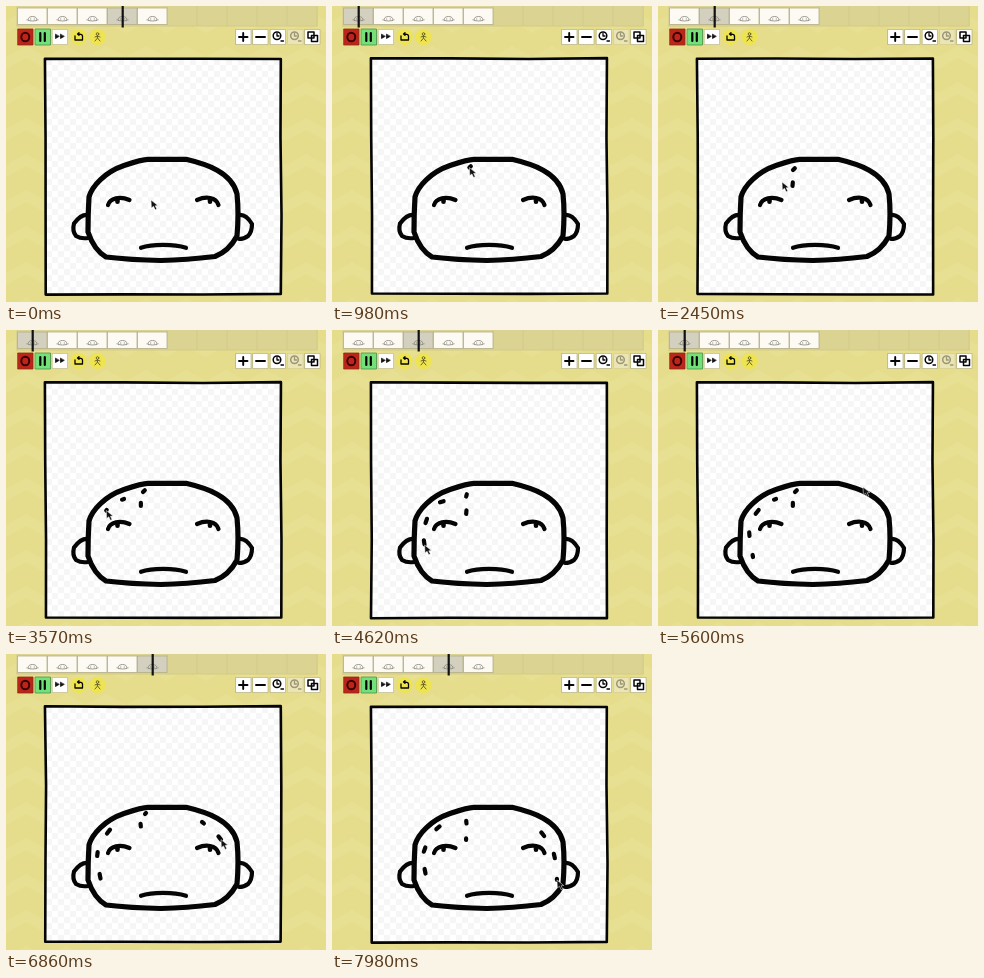
An HTML page for the animation above (8 s loop, 320 px wide and 296 px high).

```html
<!DOCTYPE html>
<html lang="en">
<head>
<meta charset="utf-8">
<title>Doodle recording</title>
<style>
html, body { margin: 0; width: 100%; height: 100%; overflow: hidden; background: #e5dd8c; }
svg { display: block; width: 100vw; height: 100vh; }
.ink { fill: none; stroke: #050505; stroke-linecap: round; stroke-linejoin: round; }
</style>
</head>
<body>
<svg viewBox="0 0 320 296" preserveAspectRatio="none">
  <defs>
    <pattern id="zigzag" width="40" height="36" patternUnits="userSpaceOnUse">
      <path d="M-2 16 20 4 42 16V28L20 16-2 28Z" fill="#e9e299"/>
    </pattern>
    <pattern id="check" x="40" y="53" width="12" height="12" patternUnits="userSpaceOnUse">
      <path d="M0 0h6v6h-6zM6 6h6v6h-6z" fill="#f6f6f6"/>
    </pattern>
  </defs>

  <rect width="320" height="296" fill="#e5dd8c"/>
  <rect width="320" height="296" fill="url(#zigzag)" opacity=".5"/>

  <rect x="10" width="302" height="20" fill="#dbd391"/>
  <path id="slots" fill="none" stroke="#d3ca88"/>
  <g id="cells"></g>
  <rect id="head" y="0" width="2.2" height="21.5" fill="#111"/>

  <g class="ink" stroke-width="1.9">
    <rect x="12" y="23" width="15" height="16" fill="#bd251b" stroke="#8b2b18" stroke-width=".8"/>
    <ellipse cx="19.3" cy="31" rx="4" ry="4.3" stroke="#300"/>
    <rect x="29.5" y="23" width="15" height="16" fill="#74e07a" stroke="#48904a" stroke-width=".8"/>
    <path d="M34.3 27v8M38.8 27v8" stroke-width="2.2"/>
    <rect x="46.5" y="23.5" width="15" height="15" fill="#fff" stroke="#b9b28a" stroke-width=".6"/>
    <path d="M49.5 28.5v4l3.5-2zM54.5 28.5v4l3.5-2z" fill="#111" stroke-width=".7"/>
    <g fill="#eee452" stroke="none">
      <circle cx="72.7" cy="31" r="8"/>
      <circle cx="91.5" cy="31" r="8"/>
    </g>
    <path d="M69 30v4h7.500v-4q0-2-5-2l1.500-1.300m-1.500 1.300 1.500 1.300" stroke-width="1.3"/>
    <g stroke="#6b6424" stroke-width="1">
      <path d="M91.500 29.500v2.500l-2.500 3M91.500 32l2.500 3M89 31l2.500-1 2.500 1"/>
      <circle cx="91.500" cy="28" r="1.300"/>
    </g>

    <g fill="#fff" stroke="#aaa47e" stroke-width=".6">
      <rect x="230" y="23.500" width="15" height="15"/>
      <rect x="247" y="23.500" width="15" height="15"/>
      <rect x="264.500" y="23.500" width="15" height="15"/>
      <rect x="282" y="23.500" width="15" height="15" fill="#ebe5b5" stroke="#d2c98d"/>
      <rect x="299" y="23.500" width="15" height="15"/>
    </g>
    <path d="M233 31h8.500M237.200 27v8M250 31h9"/>
    <g id="clock">
      <circle cx="271" cy="29.800" r="3.800" stroke-width="1.500"/>
      <path d="M271 27.500v2.500h2M275 35h2.500" stroke-width="1.300"/>
    </g>
    <use href="#clock" x="17.500" opacity=".35"/>
    <path d="M302 26h6v6h-6zM305.500 29.500h6v6h-6z" stroke-width="1.500"/>
  </g>

  <rect x="40" y="53" width="235" height="235" fill="#fff"/>
  <rect x="40" y="53" width="235" height="235" fill="url(#check)"/>
  <path id="border" class="ink" stroke-width="2.6"/>

  <g class="ink" stroke-width="5.200">
    <path d="M83 191C86 180 99 166 118 159.500Q136 153.300 142 153.300H180C200 158 226 166 231 188Q233 207 231 230Q223 245 209 250.500Q180 254 155 254.500Q125 254 100 251Q88 244 82 226Q82 207 83 191Z"/>
    <g stroke-width="4.200">
      <path d="M82 209Q75 208 68 217.500Q66 225 70 230Q75 233 82 232"/>
      <path d="M233 209Q240 208 246 218Q246 226 242 230Q238 233 233 233"/>
      <path d="M102 199C104 192 114 190 123.500 194M191 194C200 190 210 191 212.500 199"/>
      <path d="M111.500 194v1.800M204 194v1.800" stroke-width="4.600"/>
      <path d="M135 241.800C146 238 168 238 180 241.800"/>
    </g>
  </g>

  <path id="drops" class="ink" stroke-width="4.200"/>
  <path id="cursor" d="M0 0 .4 8 2.500 6.300 4.200 9.800 5.800 9 4.200 5.800 6.800 5.500Z" fill="#111" stroke="#fff" stroke-width=".5"/>
</svg>

<script>
const LOOP = 8000, STEP = 70, CELLS = 5, CELL_MS = 400 / 3, PHASE = 3.25;
const $ = id => document.getElementById(id);

// A drop starts at a cell count, lasts some cells and runs evenly through its key points.
const drops = [
  { start: 9, len: 10, keys: [[140, 159], [134, 165], [135, 174], [134, 186]] },
  { start: 25, len: 16, keys: [[118, 169], [106, 173], [96, 186], [91, 200], [92, 212], [95, 227]] },
  { start: 49, len: 15, keys: [[196, 168], [209, 178], [220, 192], [224, 209], [225, 227]] }
];
const rests = [[0, 145, 194], [2450, 124, 176], [5600, 205, 157]];

const clamp = (v, a, b) => Math.min(b, Math.max(a, v));
const mix = (a, b, k) => a + (b - a) * k;
const mixPoint = (p, q, k) => [mix(p[0], q[0], k), mix(p[1], q[1], k)];
const timeOf = count => (count - PHASE) * CELL_MS;

function along({ len, keys }, i) {
  const last = keys.length - 1;
  const u = clamp(i / (len - 1), 0, 1) * last;
  const k = Math.min(Math.floor(u), last - 1);
  return mixPoint(keys[k], keys[k + 1], u - k);
}

// Cursor stops: resting places and the two ends of every drop.
const stops = rests.concat(...drops.map(d => [
  [timeOf(d.start), ...along(d, 0)],
  [timeOf(d.start + d.len), ...along(d, d.len)]
])).sort((a, b) => a[0] - b[0]);

function cursorAt(t, count) {
  const drop = drops.find(d => count >= d.start && count < d.start + d.len);
  if (drop) return along(drop, count - drop.start - .3);
  const j = stops.findIndex(s => s[0] > t);
  const a = stops[j - 1], b = stops[j];
  const k = (t - a[0]) / (b[0] - a[0]);
  return mixPoint(a.slice(1), b.slice(1), k * k * (3 - 2 * k));
}

// Only the marks made while this cell was showing.
function strokes(count) {
  const cell = Math.floor(count) % CELLS;
  let d = "";
  for (const drop of drops) {
    const now = count - drop.start;
    const first = (cell - drop.start % CELLS + CELLS) % CELLS;
    for (let i = first; i < drop.len && i <= now; i += CELLS) {
      const [x, y] = along(drop, clamp(now - .3, i - .4, i + .5));
      d += `M${along(drop, i - .4)}L${x + .01} ${y}`;
    }
  }
  return d;
}

function random(seed) {
  return () => (seed = seed * 16807 % 2147483647) / 2147483647;
}

// Hand-drawn square: every corner and every third of a side is slightly off.
function roughBorder(cell) {
  const rnd = random(cell * 977 + 31);
  const corners = [[39.500, 52.700], [275, 52.700], [275, 288], [39.500, 288]];
  const pts = corners.flatMap((c, i) => [0, 1 / 3, 2 / 3].map(k =>
    mixPoint(c, corners[(i + 1) % 4], k).map(v => v + rnd() * 1.200 - .6)));
  return `M${pts.join("L")}Z`;
}
const borders = Array.from({ length: CELLS }, (_, i) => roughBorder(i));

let slots = "";
for (let x = 161; x < 312; x += 30) slots += `M${x} 0V20`;
$("slots").setAttribute("d", slots + "M10 20H312");

for (let i = 0; i < CELLS; i++) {
  const x = 11 + 30 * i;
  $("cells").insertAdjacentHTML("beforeend",
    `<rect x="${x + .5}" y="2" width="29.5" height="16.5" stroke="#b5ae85" stroke-width=".8"/>
     <path d="M${x + 11} 14.5q0-4 4.500-4t4.500 4q-4.500 1-9 0zm-1-1.200v1m11-1v1m-8-1.300h1.200m2.600 0h1.200"
       fill="none" stroke="#85827a" stroke-width=".8"/>`);
}
const boxes = $("cells").querySelectorAll("rect");

function draw(t) {
  const count = PHASE + t / CELL_MS;
  const cell = Math.floor(count) % CELLS;
  boxes.forEach((b, i) => b.setAttribute("fill", i === cell ? "#d3d0bf" : "#fcfaf3"));
  $("head").setAttribute("x", 25.600 + 30 * cell);
  $("border").setAttribute("d", borders[cell]);
  $("drops").setAttribute("d", strokes(count));
  $("cursor").setAttribute("transform", `translate(${cursorAt(t, count)})`);
}

const origin = performance.now();
function tick() {
  const t = (performance.now() - origin) % LOOP;
  draw(Math.floor(t / STEP) * STEP);
  requestAnimationFrame(tick);
}
tick();
</script>
</body>
</html>
```
